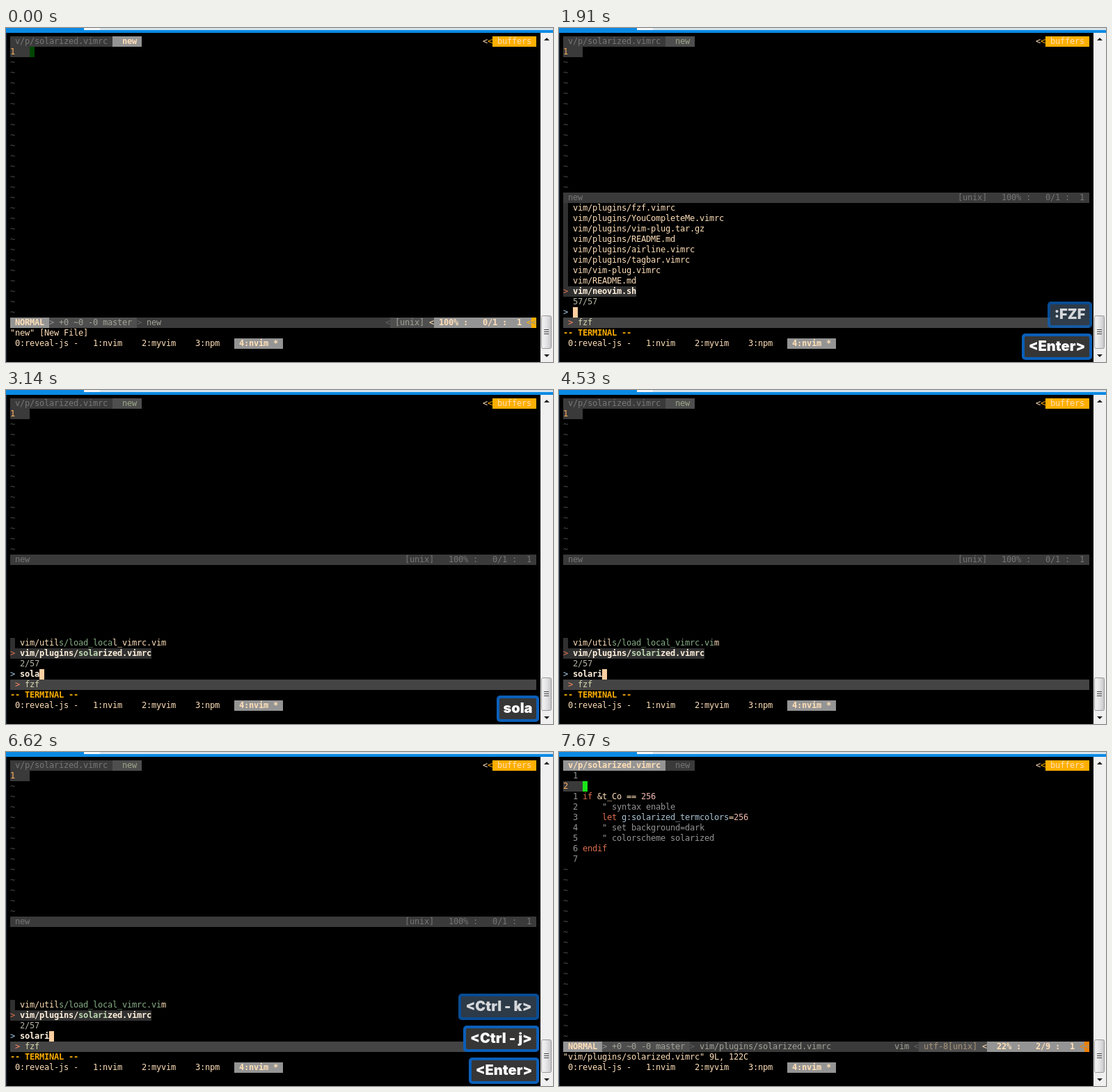
These frames come from a looping animation (786x481 px, 8 s). An HTML page with a canvas:

```html
<!DOCTYPE html>
<html lang="en">
<head>
<meta charset="utf-8">
<title>Fuzzy file search in a terminal</title>
<style>
  html, body { margin: 0; width: 100%; height: 100%; overflow: hidden; background: #000; }
  canvas { display: block; }
</style>
</head>
<body>
<canvas id="stage" width="786" height="481"></canvas>
<script>
const ctx = document.getElementById('stage').getContext('2d');
const LOOP = 8000;
const CELL_W = 7, CELL_H = 15, LEFT = 6, TOP = 12, COLS = 108;

const C = {
  fg: '#ffdfb8', bright: '#fff0dc', gray: '#949494', dim: '#767676', mid: '#4e4e4e',
  dark: '#3a3a3a', pick: '#303030', amber: '#ffaf00', orange: '#ffaf5f', red: '#e0704f',
  tilde: '#4c4c4c', label: '#a2a298', match: '#87af87', matchBold: '#bcd7af',
  ident: '#a9c4d4', number: '#f0b8b0', green: '#1ae61a', prompt: '#a8cbe8', peach: '#ffcfa0'
};

function rect(x, y, w, h, color) {
  ctx.fillStyle = color;
  ctx.fillRect(x, y, w, h);
}

function fill(row, col, count, color) {
  rect(LEFT + col * CELL_W, TOP + row * CELL_H, count * CELL_W, CELL_H, color);
}

// Text sits on the terminal grid, one character per cell.
function put(row, col, text, color = C.fg, bold = false) {
  ctx.font = `${bold ? 'bold ' : ''}12px "DejaVu Sans Mono", monospace`;
  ctx.textAlign = 'left';
  ctx.fillStyle = color;
  [...text].forEach((ch, i) => {
    if (ch !== ' ') ctx.fillText(ch, LEFT + (col + i) * CELL_W, TOP + row * CELL_H + 11);
  });
}

function block(row, col, text, bg, color, bold) {
  fill(row, col, text.length, bg);
  put(row, col, text, color, bold);
}

function tildes(from, to) {
  for (let r = from; r <= to; r++) put(r, 0, '~', C.tilde);
}

// Window frame and scroll bar

function triangle(x, y, dir) {
  ctx.fillStyle = '#222';
  ctx.beginPath();
  ctx.moveTo(x - 4, y);
  ctx.lineTo(x + 4, y);
  ctx.lineTo(x, y + 4 * dir);
  ctx.fill();
}

function drawWindow() {
  rect(0, 0, 786, 481, '#000');
  rect(0, 0, 112, 3, '#0a8ae4');
  rect(112, 0, 23, 3, '#f4f6f8');
  rect(135, 0, 651, 3, '#d6e2ec');
  rect(0, 3, 786, 4, '#0a8ae4');
  rect(0, 7, 1, 474, '#1d2c45');
  rect(768, 7, 18, 474, '#f0f0f0');
  triangle(777, 18, -1);
  triangle(777, 470, 1);

  const shade = ctx.createLinearGradient(769, 0, 784, 0);
  shade.addColorStop(0, '#f6f6f6');
  shade.addColorStop(0.5, '#e4e4e6');
  shade.addColorStop(1, '#c4c4c8');
  ctx.beginPath();
  ctx.roundRect(769.5, 414.5, 14, 47, 2);
  ctx.fillStyle = shade;
  ctx.fill();
  ctx.lineWidth = 1;
  ctx.strokeStyle = '#979797';
  ctx.stroke();
  for (let y = 434; y <= 440; y += 3) rect(773, y, 7, 1, '#444');
}

// Editor

function drawTabs(mode) {
  const first = ' v/p/solarized.vimrc ', second = '  new ';
  if (mode === 'file') {
    block(0, 0, first, C.gray, C.fg, true);
    block(0, 21, second, C.dark, C.dim);
  } else {
    block(0, 0, first, C.dark, C.dim);
    if (mode === 'edit') block(0, 21, second, C.gray, C.fg, true);
    else block(0, 21, second, C.mid, '#9ca688');
  }
  put(0, 97, '<', C.fg);
  put(0, 98, '<', C.amber);
  block(0, 99, ' buffers ', C.amber, C.fg);
}

function drawTmux() {
  put(29, 1, '0:reveal-js -');
  put(29, 17, '1:nvim');
  put(29, 27, '2:myvim');
  put(29, 38, '3:npm');
  block(29, 46, ' 4:nvim * ', C.gray, C.fg, true);
}

function drawStatus({ name, type, encoding, percent, line, tail }) {
  fill(27, 0, COLS, C.dark);
  block(27, 0, ' NORMAL ', C.gray, C.fg, true);
  fill(27, 8, 18, C.mid);
  put(27, 8, '>', C.gray);
  put(27, 10, '+0 ~0 -0 master', C.label);
  put(27, 26, '>', '#626262');
  put(27, 28, name, C.label);
  const start = 85 - encoding.length;
  put(27, start - 6, type, C.label);
  put(27, start - 2, '<', '#626262');
  fill(27, start - 1, 88 - start, C.mid);
  put(27, start, encoding, type ? '#a89478' : C.label);
  put(27, 86, '<', C.fg);
  fill(27, 87, 21, C.gray);
  put(27, 88, `${percent.padStart(4)} :   ${line} :  1`, C.fg, true);
  put(27, 106, '<', tail);
  block(27, 107, '<', tail, C.gray);
}

function drawNumberLine(row, number) {
  block(row, 0, number.padEnd(4), C.dark, C.orange);
}

function drawEmptyBuffer(t) {
  drawTabs('edit');
  drawNumberLine(1, '1');
  tildes(2, 26);
  drawStatus({ name: 'new', type: '', encoding: '[unix]', percent: '100%', line: '0/1', tail: C.amber });
  if (t < 500) {
    fill(1, 4, 1, '#004600');
    put(28, 0, '"new" [New File]');
  } else {
    const command = latest(TYPED_COMMAND, t);
    put(28, 0, command);
    fill(28, command.length, 1, C.green);
  }
}

function drawFile() {
  drawTabs('file');
  put(1, 2, '1', C.gray);
  drawNumberLine(2, '2');
  fill(2, 4, 1, C.green);
  for (let n = 1; n <= 7; n++) put(n + 2, 2, String(n), C.gray);
  put(3, 4, 'if', C.red);
  put(3, 7, '&t_Co ==');
  put(3, 16, '256', C.number);
  put(4, 8, '" syntax enable', C.gray);
  put(5, 8, 'let', C.red);
  put(5, 12, 'g:solarized_termcolors', C.ident);
  put(5, 34, '=');
  put(5, 35, '256', C.number);
  put(6, 8, '" set background=dark', C.gray);
  put(7, 8, '" colorscheme solarized', C.gray);
  put(8, 4, 'endif', C.red);
  tildes(10, 26);
  drawStatus({
    name: 'vim/plugins/solarized.vimrc', type: 'vim', encoding: 'utf-8[unix]',
    percent: '22%', line: '2/9', tail: '#f08000'
  });
  put(28, 0, '"vim/plugins/solarized.vimrc" 9L, 122C');
}

// Fuzzy finder

const FILES = [
  'vim/neovim.sh', 'vim/README.md', 'vim/vim-plug.vimrc', 'vim/plugins/tagbar.vimrc',
  'vim/plugins/airline.vimrc', 'vim/plugins/README.md', 'vim/plugins/vim-plug.tar.gz',
  'vim/plugins/YouCompleteMe.vimrc', 'vim/plugins/fzf.vimrc',
  'vim/plugins/solarized.vimrc', 'vim/utils/load_local_vimrc.vim'
];

// Shortest range ending at the first subsequence match.
function findRange(text, query) {
  if (!query) return [0, 0];
  const s = text.toLowerCase();
  let end = -1;
  for (const ch of query) {
    end = s.indexOf(ch, end + 1);
    if (end < 0) return null;
  }
  let start = end + 1;
  for (const ch of [...query].reverse()) start = s.lastIndexOf(ch, start - 1);
  return [start, end + 1];
}

function search(query) {
  const hits = FILES.map(text => ({ text, range: findRange(text, query) })).filter(h => h.range);
  const span = h => h.range[1] - h.range[0];
  if (query) hits.sort((a, b) => span(a) - span(b) || a.text.length - b.text.length);
  return hits;
}

function drawHit({ text, range: [from, to] }, row, selected) {
  fill(row, 0, selected ? text.length + 2 : 1, C.pick);
  if (selected) put(row, 0, '>', C.red);
  const base = selected ? C.bright : C.fg;
  put(row, 2, text.slice(0, from), base, selected);
  put(row, 2 + from, text.slice(from, to), selected ? C.matchBold : C.match, selected);
  put(row, 2 + to, text.slice(to), base, selected);
}

function drawFinder(t) {
  drawTabs('finder');
  drawNumberLine(1, '1');
  tildes(2, 14);
  fill(15, 0, COLS, C.dark);
  put(15, 1, 'new', C.dim);
  put(15, 81, '[unix]   100% :   0/1 :  1', C.dim);

  if (t >= 1540) {
    const query = latest(TYPED_QUERY, t);
    const hits = search(t >= 3450 && t < 3530 ? 'solar' : query);
    const selected = t >= 5840 && t < 6070 ? 1 : 0;
    hits.slice(0, 9).forEach((hit, i) => drawHit(hit, 24 - i, i === selected));
    const count = query === '' ? 57 : query === 's' ? 41 : hits.length;
    put(25, 2, `${count}/57`, '#b4b4a4');
    put(26, 0, '>', C.prompt);
    put(26, 2, query, C.bright, true);
    fill(26, 2 + query.length, 1, C.peach);
  }

  fill(27, 0, COLS, '#444444');
  put(27, 1, '>', '#ff875f');
  put(27, 3, 'fzf', '#d8d8b0');
  put(28, 0, '-- TERMINAL --', C.amber, true);
}

// Key press badges

const TYPED_COMMAND = [[500, ':'], [900, ':F'], [980, ':FZ'], [1060, ':FZF']];
const TYPED_QUERY = [
  [0, ''], [2690, 's'], [2840, 'so'], [2990, 'sol'], [3140, 'sola'], [3290, 'solar'], [3450, 'solari']
];
const BADGES = [
  { keys: TYPED_COMMAND, fade: 1910 },
  { keys: [[1460, '<Enter>']], fade: 2280 },
  { keys: TYPED_QUERY.slice(1), fade: 4300 },
  { keys: [[5840, '<Ctrl - k>']], fade: 6620 },
  { keys: [[6070, '<Ctrl - j>']], fade: 6880 },
  { keys: [[6620, '<Enter>']], fade: 7440 }
];
const FADE_STEP = 76, FADE = [0.8, 0.55, 0.28, 0];

function latest(steps, t) {
  let value = '';
  for (const [at, text] of steps) if (t >= at) value = text;
  return value;
}

// Approximate advance of a heavy sans letter, in em.
function advance(ch) {
  if (':l -ij'.includes(ch)) return 0.333;
  if ('tr'.includes(ch)) return 0.444;
  if ('EZ'.includes(ch)) return 0.722;
  return ch === 'C' ? 0.778 : ch === 's' ? 0.61 : 0.664;
}

function drawBadge(text, y, alpha) {
  const w = Math.round([...text].reduce((sum, ch) => sum + advance(ch) * 20, 16));
  const x = 766 - w;
  ctx.save();
  ctx.globalAlpha = alpha;
  ctx.beginPath();
  ctx.roundRect(x, y, w, 38, 5);
  ctx.fillStyle = '#0b5fb8';
  ctx.fill();
  ctx.beginPath();
  ctx.roundRect(x + 4, y + 4, w - 8, 30, 2);
  ctx.fillStyle = '#363636';
  ctx.fill();
  ctx.font = '900 20px Inter, sans-serif';
  ctx.textAlign = 'center';
  ctx.fillStyle = '#fff';
  ctx.fillText(text, x + w / 2, y + 25);
  ctx.restore();
}

function drawBadges(t) {
  const shown = BADGES.filter(b => t >= b.keys[0][0] && t < b.fade + 3 * FADE_STEP);
  shown.forEach((badge, i) => {
    const alpha = t < badge.fade ? 1 : FADE[Math.floor((t - badge.fade) / FADE_STEP)];
    drawBadge(latest(badge.keys, t), 440 - 46 * (shown.length - 1 - i), alpha);
  });
}

function draw(t) {
  drawWindow();
  if (t < 1460) drawEmptyBuffer(t);
  else if (t < 6700) drawFinder(t);
  else drawFile();
  drawTmux();
  drawBadges(t);
}

const begin = performance.now();
function tick() {
  draw((performance.now() - begin) % LOOP);
  requestAnimationFrame(tick);
}
tick();
</script>
</body>
</html>
```
